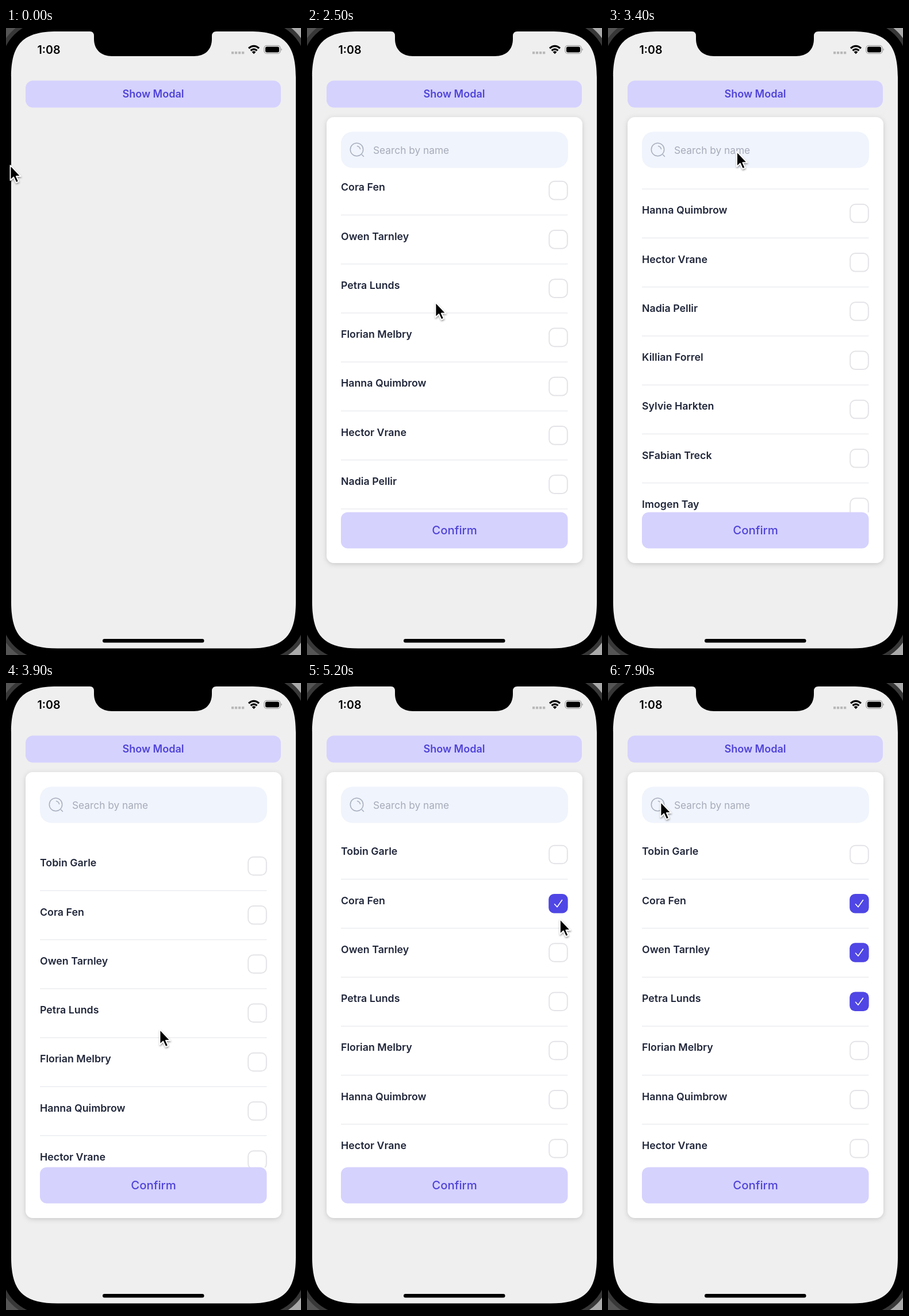
An HTML page for the animation above (8000 ms loop, 513 px wide and 1091 px high).

```html
<!DOCTYPE html>
<html lang="en">
<head>
<meta charset="utf-8">
<title>Modal list</title>
<style>
  html, body { margin: 0; width: 100%; height: 100%; overflow: hidden; background: #000; }
  svg { display: block; width: 100%; height: 100%; }
  text { font-family: Inter, Roboto, sans-serif; font-weight: 600; }
</style>
</head>
<body>
<svg viewBox="0 0 513 1091">
  <defs>
    <clipPath id="listClip"><rect x="57" y="257" width="400" height="586"/></clipPath>
    <filter id="cardShadow" x="-10%" y="-10%" width="120%" height="120%">
      <feDropShadow dx="0" dy="2" stdDeviation="4" flood-color="#000" flood-opacity=".17"/>
    </filter>
    <filter id="cursorShadow" x="-50%" y="-50%" width="200%" height="200%">
      <feDropShadow dx="0.5" dy="2" stdDeviation="1.5" flood-color="#000" flood-opacity=".4"/>
    </filter>
  </defs>

  <!-- phone body -->
  <rect width="256" height="1091" fill="#555"/>
  <rect x="256" width="257" height="1091" fill="#aaa"/>
  <rect x="-12" y="-15" width="537" height="1117" rx="82" stroke="#383838" stroke-width="7"/>
  <path fill="#efefef" d="M89 6H146Q153 6 153 14V19C153 38 166 49 184 49H327C346 49 358 38 358 19V14
    Q358 6 366 6H424C483 6 504 27 504 86V999C504 1058 483 1079.500 424 1079.500H89C30 1079.500 9 1058 9 999V86C9 27 30 6 89 6Z"/>
  <rect x="168" y="1063" width="176.500" height="6.500" rx="3.200"/>

  <!-- status bar -->
  <text x="54.500" y="45" font-size="19.600">1:08</text>
  <path d="M392 43.200H415" stroke="#b9b9b9" stroke-width="4.200" stroke-dasharray="4.200 1.800"/>
  <g fill="none" stroke="#000" stroke-width="3.200">
    <path d="M422 35.200Q431 27.500 440 35.200"/>
    <path d="M425.500 39.200Q431 34.600 436.500 39.200"/>
  </g>
  <path d="M427.600 41.700Q431 39 434.400 41.700L431 45.300Z"/>
  <rect x="449" y="30.500" width="28" height="14" rx="4.500" fill="none" stroke="#929292" stroke-width="1.200"/>
  <rect x="451" y="32.500" width="24" height="10" rx="2.700"/>
  <path d="M478.500 35.300Q481 37.500 478.500 39.700Z" fill="#929292"/>

  <rect x="34" y="91.500" width="444" height="47" rx="13" fill="#d5d2fe"/>
  <text x="256" y="121" font-size="18" text-anchor="middle" fill="#4f43d8">Show Modal</text>

  <g id="modal">
    <rect x="34" y="155" width="445" height="776" rx="13" fill="#fff" filter="url(#cardShadow)"/>
    <rect x="59" y="180.500" width="395" height="63" rx="20" fill="#f0f4fc"/>
    <g fill="none" stroke="#a7aebd" stroke-width="1.500" stroke-linecap="round">
      <circle cx="86.500" cy="211.500" r="11.200"/>
      <path d="M87.500 205.500Q91.500 206.500 92.500 210.500M95.500 220.500L98.500 223.500"/>
    </g>
    <text x="115" y="219" font-size="17.300" style="font-weight:400" fill="#a6abba">Search by name</text>
    <g clip-path="url(#listClip)"><g id="list"></g></g>
    <rect x="59" y="842.500" width="394.500" height="63" rx="12" fill="#d5d2fe"/>
    <text x="256.500" y="881" font-size="20.300" style="font-weight:500" text-anchor="middle" fill="#4f43d8">Confirm</text>
  </g>

  <path id="cursor" d="M1.500 1V27L7.300 21.500L11.600 31L15.900 29.100L11.800 20H19.500Z"
    stroke="#fff" stroke-width="1.800" stroke-linejoin="round" filter="url(#cursorShadow)"/>
</svg>
<script>
const LOOP = 8000, TICK = 100, ROW = 85.25;
const $ = id => document.getElementById(id);
const people = ["Tobin Garle", "Cora Fen", "Owen Tarnley", "Petra Lunds", "Florian Melbry",
  "Hanna Quimbrow", "Hector Vrane", "Nadia Pellir", "Killian Forrel", "Sylvie Harkten",
  "SFabian Treck", "Imogen Tay"];

// Rows 1 to 3 are ticked one after another
const tickTime = row => row >= 1 && row <= 3 ? 4800 + (row - 1) * 700 : Infinity;

// Eased move of a value by `delta` between two times
function ease(t, from, to, delta = 1) {
  const p = Math.min(1, Math.max(0, (t - from) / (to - from)));
  return delta * p * p * (3 - 2 * p);
}

// Pointer gestures: start, end, dx, dy
const moves = [
  [0, 700, 189, -130],    // to the button
  [1200, 2200, 28, 471],  // into the list
  [2400, 2700, -4, -396], // flick up
  [3300, 3900, 47, 419],  // drag back down
  [3900, 4700, 170, -217],
  [5000, 5500, 7, 71],
  [5600, 6100, -7, 99],
  [6400, 7900, -346, -349]
];

const cursorAt = t => moves.reduce(
  ([x, y], [from, to, dx, dy]) => [x + ease(t, from, to, dx), y + ease(t, from, to, dy)], [6, 238]);

// Scroll down, pull back past the top, settle
const scrollAt = t => ease(t, 2400, 2720, 436) + ease(t, 3300, 3900, -456) + ease(t, 3900, 4400, 20);

$("list").innerHTML = people.map((name, i) => `
  <g transform="translate(0 ${i * ROW})">
    <text x="59" y="299.3" font-size="17.8" fill="#20263a">${name}</text>
    <rect x="421.2" y="282.7" width="31.6" height="31.6" rx="9" fill="#fff" stroke="#e4e4e8" stroke-width="2"/>
    <g class="tick">
      <rect x="420.2" y="281.8" width="33.4" height="33.4" rx="9.5" fill="#4f46e5"/>
      <path d="M430.5 299.5L435 304.5L443.5 292.5" fill="none" stroke="#fff" stroke-width="1.6" stroke-linecap="round" stroke-linejoin="round"/>
    </g>
    <path d="M59 341.3H453.5" stroke="#e8e9ed" stroke-width="1.3"/>
  </g>`).join("");
const ticks = [...document.querySelectorAll(".tick")];

function draw(ms) {
  const t = Math.floor(ms % LOOP / TICK) * TICK;
  $("cursor").setAttribute("transform", `translate(${cursorAt(t)})`);
  $("list").setAttribute("transform", `translate(0 ${-scrollAt(t)})`);
  $("modal").setAttribute("opacity", ease(t, 1100, 1600));
  ticks.forEach((el, i) => el.setAttribute("visibility", t >= tickTime(i) ? "visible" : "hidden"));
}

const start = performance.now();
function frame() {
  draw(performance.now() - start);
  requestAnimationFrame(frame);
}
frame();
</script>
</body>
</html>
```
